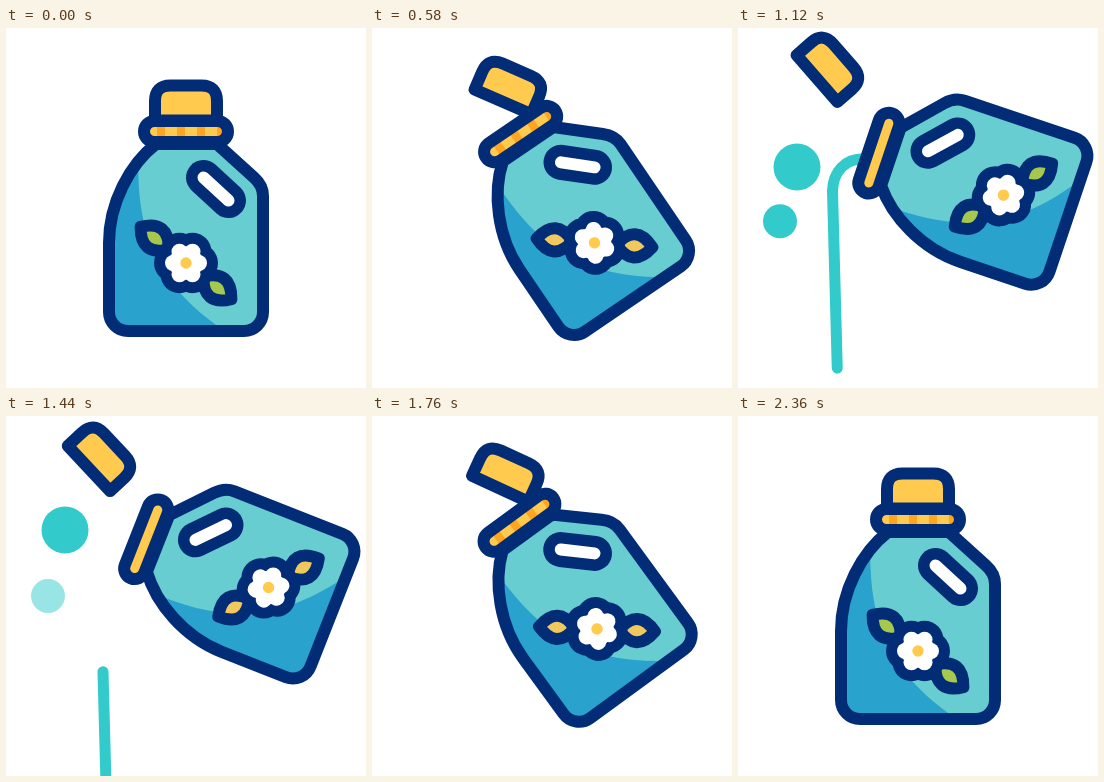
Write an HTML page with a canvas that moves like this. It is 360 by 360 pixels and loops after 2400 ms.

```html
<!DOCTYPE html>
<html>
<head>
<meta charset="utf-8">
<style>
html, body { margin: 0; width: 100%; height: 100%; overflow: hidden; background: #fff; }
canvas { display: block; width: 360px; height: 360px; }
</style>
</head>
<body>
<canvas id="stage"></canvas>
<script>
const LOOP = 2400, HALF = 1175, OUTLINE = 12;
const NAVY = '#032c76', LIGHT = '#68cdd0', BLUE = '#29a2ce', YELLOW = '#ffca4e',
  ORANGE = '#ffa51f', GREEN = '#a6c84d', SAND = '#f0c85c', TEAL = '#32cacb';
const canvas = document.getElementById('stage');
const ctx = canvas.getContext('2d');
const ratio = window.devicePixelRatio || 1;
canvas.width = canvas.height = 360 * ratio;

const radians = degrees => degrees * Math.PI / 180;
const clamp = v => Math.min(1, Math.max(0, v));
const ramp = (t, from, to) => clamp((t - from) / (to - from));
const within = (t, from, to) => t >= from && t < to;

// cubic-bezier(.75, 0, .25, 1), solved by bisection
function ease(x) {
  let lo = 0, hi = 1;
  for (let i = 0; i < 24; i++) {
    const s = (lo + hi) / 2, r = 1 - s;
    if (2.25 * r * r * s + 0.75 * r * s * s + s * s * s < x) lo = s; else hi = s;
  }
  return lo * lo * (3 - 2 * lo);
}

const bodyPath = new Path2D(`M150 116 L211 116 L248 149.5 Q257 157.5 257 168 L257 284
  A19 19 0 0 1 238 303 L122 303 A19 19 0 0 1 103 284 L103 215
  C103 175 124 136 150 116 Z`);
const shadePath = new Path2D('M133 110 C128 200 146 252 216 301 L216 320 L90 320 L90 110 Z');
const capPath = new Path2D(`M-31 17.5 L-31 -2 Q-31 -17.5 -15.5 -17.5 L15.5 -17.5
  Q31 -17.5 31 -2 L31 17.5 Z`);
const leafPath = new Path2D('M-58 0 C-46 -15.5 -34 -15.5 -22 0 C-34 15.5 -46 15.5 -58 0 Z');
const ringPath = new Path2D();
ringPath.roundRect(138, 93, 84, 21, 10.5);
const handlePath = new Path2D('M197.5 149.5 L222.5 172.5');
const streamPath = new Path2D('M130 131 C106 129 95 145 94.5 163 L100 368');

function line(path, width, color) {
  ctx.lineWidth = width;
  ctx.strokeStyle = color;
  ctx.stroke(path);
}

function shape(path, fill) {
  ctx.fillStyle = fill;
  ctx.fill(path);
  line(path, OUTLINE, NAVY);
}

function disc(x, y, r, color) {
  ctx.fillStyle = color;
  ctx.beginPath();
  ctx.arc(x, y, r, 0, Math.PI * 2);
  ctx.fill();
}

function petals(core, r, color) {
  disc(0, 0, core, color);
  for (let i = 0; i < 6; i++) {
    const a = i * Math.PI / 3;
    disc(13 * Math.cos(a), 13 * Math.sin(a), r, color);
  }
}

function drawFlower(leafColor) {
  ctx.save();
  ctx.translate(180, 235);
  ctx.save();
  ctx.rotate(radians(38.5));
  for (let i = 0; i < 2; i++) {
    shape(leafPath, leafColor);
    ctx.rotate(Math.PI);
  }
  ctx.restore();
  petals(20, 19, NAVY);
  petals(16.8, 8, '#fff');
  disc(0, 0, 5.7, YELLOW);
  ctx.restore();
}

function drawRing(striped) {
  ctx.fillStyle = YELLOW;
  ctx.fill(ringPath);
  if (striped) {
    ctx.fillStyle = ORANGE;
    for (let x = 151; x < 215; x += 20) ctx.fillRect(x, 97, 8, 13);
  }
  line(ringPath, OUTLINE, NAVY);
}

function drawBubbles(t) {
  ctx.globalAlpha = ramp(t, 700, 865) * (1 - ramp(t, 1520, 1680));
  disc(59, 161 - (t - 840) * 0.0783, 23.5, TEAL);
  ctx.globalAlpha = ramp(t, 825, 985) * (1 - ramp(t, 1280, 1600));
  disc(42, 205 - (t - 840) * 0.0417, 17, TEAL);
  ctx.globalAlpha = 1;
}

function drawStream(t) {
  const head = Math.max(0, (t - 759) * 0.64), tail = Math.max(0, (t - 1211) * 0.64);
  if (head <= 0 || tail > 260) return;
  ctx.setLineDash([Math.max(0.1, head - tail), 2000]);
  ctx.lineDashOffset = -tail;
  line(streamPath, 11, TEAL);
  ctx.setLineDash([]);
}

function drawCap(k) {
  ctx.save();
  ctx.translate(180 - 88 * k, 75 - 36 * k);
  ctx.rotate(radians(49 * k));
  shape(capPath, YELLOW);
  ctx.restore();
}

function drawBottle(k, t) {
  const shift = Math.pow(k, 1.43);
  ctx.save();
  ctx.translate(180 + 33.4 * shift, 180 - 30.5 * shift);
  ctx.rotate(radians(-71.5 * k));
  ctx.translate(-180, -180);
  ctx.fillStyle = LIGHT;
  ctx.fill(bodyPath);
  ctx.save();
  ctx.clip(bodyPath);
  ctx.fillStyle = BLUE;
  ctx.fill(shadePath);
  ctx.restore();
  line(bodyPath, OUTLINE, NAVY);
  line(handlePath, 35, NAVY);
  line(handlePath, 12, '#fff');
  drawFlower(within(t, 500, 700) || within(t, 1300, 1900) ? SAND : GREEN);
  drawRing(!within(t, 700, 1600) && !within(t, 1900, 2200));
  ctx.restore();
}

function render(now) {
  const t = now % LOOP;
  const k = ease(clamp(1 - Math.abs(t - HALF) / HALF));
  ctx.setTransform(ratio, 0, 0, ratio, 0, 0);
  ctx.fillStyle = '#fff';
  ctx.fillRect(0, 0, 360, 360);
  ctx.lineJoin = ctx.lineCap = 'round';
  drawBubbles(t);
  drawStream(t);
  drawCap(k);
  drawBottle(k, t);
}

const start = performance.now();
function tick() {
  render(performance.now() - start);
  requestAnimationFrame(tick);
}
tick();
</script>
</body>
</html>
```
